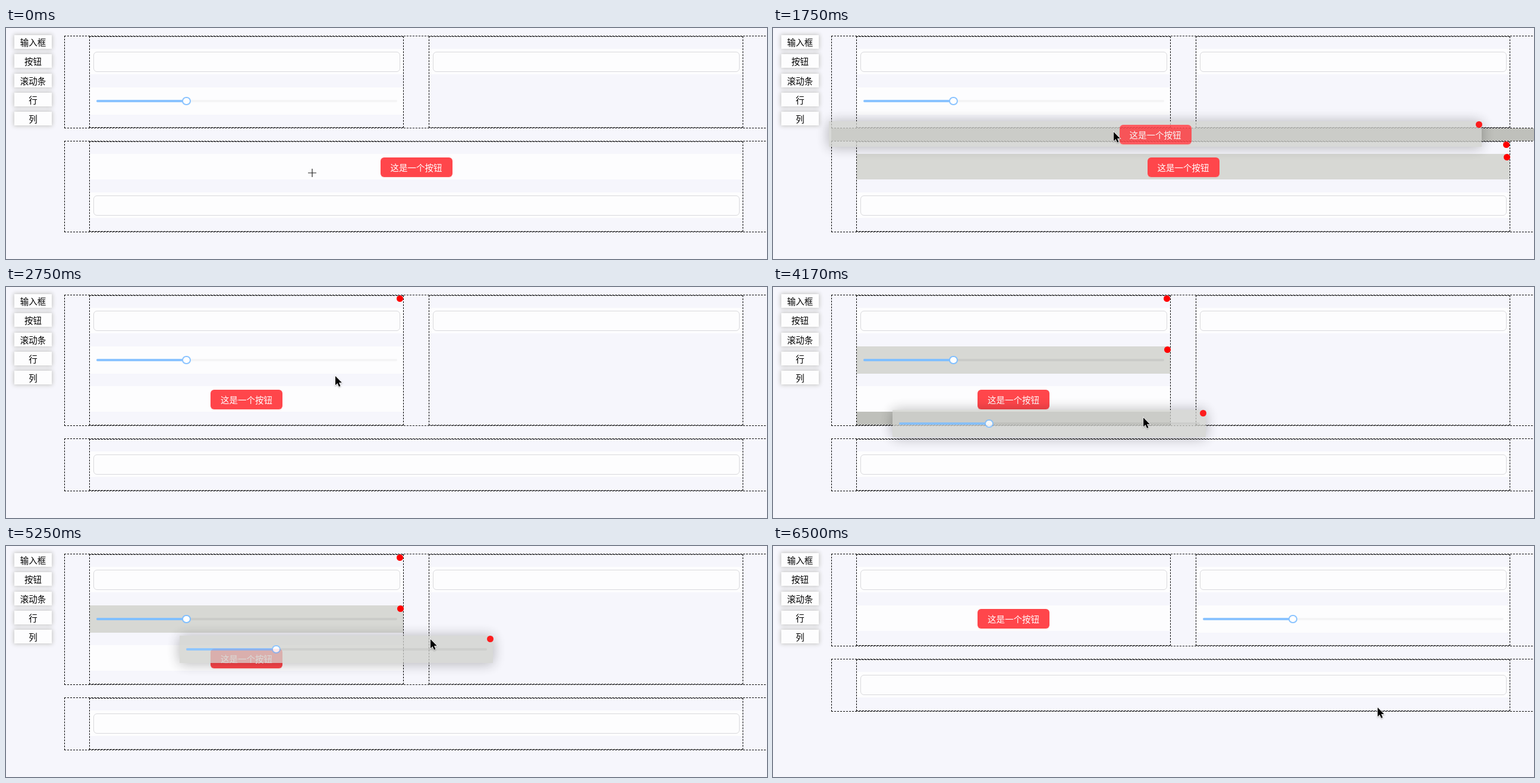
An HTML page for the animation above (6.58 s loop, 1280 by 389 pixels).

```html
<!DOCTYPE html>
<html lang="zh-CN">
<head>
<meta charset="utf-8">
<title>拖拽布局</title>
<style>
  html, body { margin: 0; width: 100%; height: 100%; overflow: hidden; }
  #stage {
    position: relative; width: 1280px; height: 389px; overflow: hidden;
    background: #f6f6fc; color: #000;
    font: 14.5px/23px "Noto Sans CJK SC", "Noto Sans CJK", sans-serif;
  }
  #stage div, #stage svg { position: absolute; box-sizing: border-box; }
  .menu { text-align: center; font-weight: 500; background: #fdfdfe; box-shadow: 0 0 7px 1px #c3c3c0; }
  .row, .col { border: 1px dashed #000; }
  .item { background: #fdfdfe; }
  .input { border: 1px solid #d9d9dc; border-radius: 6px; }
  .button {
    border-radius: 6px; background: #ff464b; color: #fff; text-align: center;
    line-height: 33px; box-shadow: 0 2px 1px rgba(255, 38, 5, .07);
  }
  .rail { border-radius: 2px; background: rgba(0, 0, 0, .035); }
  .track { border-radius: 2px; background: #8ac3ff; }
  .knob { border-radius: 50%; border: 2px solid #8ac3ff; background: #fff; }
  .dot { width: 11px; height: 11px; border-radius: 50%; background: #f00; display: none; }
  .hover > .dot { display: block; }
  .item.hover { background: #d7d8d4; }
  .active .rail { background: rgba(0, 0, 0, .06); }
  .active .track { background: #80bfff; }
  .active .knob { border-color: #80bfff; }
  .slot { background: #bfc0bb; }
  .ghost { opacity: .88; box-shadow: 0 1px 22px rgba(0, 0, 0, .33); }
  .item.ghost { background: rgba(207, 208, 204, .87); }
  .hidden { display: none; }
</style>
</head>
<body>
<div id="stage"></div>
<script>
const LOOP = 6580, GAP = 21.3;
const HEIGHT = { input: 43.4, button: 43.4, slider: 45.6 };
const stage = document.getElementById('stage');

function box(parent, cls, x, y, w, h, text = '') {
  const el = document.createElement('div');
  el.className = cls;
  Object.assign(el.style, { left: x + 'px', top: y + 'px' });
  if (w) Object.assign(el.style, { width: w + 'px', height: h + 'px' });
  el.textContent = text;
  parent.append(el);
  return el;
}

function addItem(parent, kind, x, y, w) {
  const el = box(parent, 'item', x, y, w, Math.round(HEIGHT[kind]));
  if (kind === 'input') box(el, 'input', 5.5, 5, w - 11, 33.5);
  if (kind === 'button') box(el, 'button', w / 2 - 60.5, 5.5, 121, 33, '这是一个按钮');
  if (kind === 'slider') {
    box(el, 'rail', 11, 20.5, w - 21, 4);
    box(el, 'track', 11, 20.5, 151, 4);
    box(el, 'knob', 155, 15.5, 14.5, 14.5);
  }
  box(el, 'dot', w - 10.5, 0);
  return el;
}

// Each row is a list of columns: [x, width, kinds].
function buildLayout(rows) {
  const root = box(stage, 'hidden', 0, 0, 1280, 389);
  const parts = { root };
  let top = 13;
  rows.forEach((cols, r) => {
    const inner = Math.max(...cols.map(c => c[2].reduce((s, k) => s + HEIGHT[k] + GAP, GAP)));
    const y = Math.round(top), h = Math.round(top + inner + 3) - y;
    box(root, 'row', 98, y, 1240, h);
    cols.forEach(([x, w, kinds], c) => {
      const col = box(root, 'col', x, y + 1, w, h - 2);
      box(col, 'dot', w - 13, -1);
      parts['col' + r + c] = col;
      let iy = top + 1 + GAP;
      for (const kind of kinds) {
        parts[kind + r + c] = addItem(root, kind, x + 1, Math.round(iy), w - 2);
        iy += HEIGHT[kind] + GAP;
      }
    });
    top += inner + 2 + GAP + .7;
  });
  return parts;
}

const left = kinds => [140, 529, kinds];
const right = kinds => [711, 529, kinds];
const wide = kinds => [140, 1100, kinds];
const layouts = [
  buildLayout([[left(['input', 'slider']), right(['input'])], [wide(['button', 'input'])]]),
  buildLayout([[left(['input', 'slider', 'button']), right(['input'])], [wide(['input'])]]),
  buildLayout([[left(['input', 'button']), right(['input', 'slider'])], [wide(['input'])]])
];

['输入框', '按钮', '滚动条', '行', '列'].forEach((label, i) =>
  box(stage, 'menu', 14, 12 + 32.25 * i, 63, 23, label));

const slots = {
  rowGapA: box(stage, 'slot', 98, 169, 1182, 21),
  leftEndA: box(stage, 'slot', 141, 146, 527, 21),
  leftEndB: box(stage, 'slot', 141, 210, 527, 22),
  rowGapB: box(stage, 'slot', 98, 233, 1182, 21),
  colGap: box(stage, 'slot', 669, 14, 42, 218),
  rightEnd: box(stage, 'slot', 712, 79, 527, 21)
};

// Dragged copies with the pointer position at which they were picked up.
const drags = [
  { el: addItem(stage, 'button', 141, 212, 1098), from: 1500, to: 2750, x: 620, y: 230 },
  { el: addItem(stage, 'slider', 141, 100, 527), from: 4170, to: 6170, x: 563, y: 113 }
];
drags.forEach(d => d.el.classList.add('ghost', 'hover', 'active'));

stage.insertAdjacentHTML('beforeend', `
  <svg id="cross" width="16" height="16" viewBox="-8 -8 16 16">
    <path d="M-7 0H7M0-7V7" stroke="#fff" stroke-width="2.4" opacity=".7"/>
    <path d="M-7 0H7M0-7V7" stroke="#222" stroke-width="1.2"/>
  </svg>
  <svg id="arrow" width="18" height="24" viewBox="-3 -3 18 24" style="filter:drop-shadow(0 1px 1px rgba(0,0,0,.3))">
    <path d="M0 0V15.2L3.5 12L6 17.8L8.5 16.7L6 11H10.8Z" stroke="#fff" stroke-width="1.6" paint-order="stroke"/>
  </svg>`);
const cross = document.getElementById('cross'), arrow = document.getElementById('arrow');

// [time, x, y, drag lag]
const pointer = [
  [0, 515, 244], [170, 590, 236], [250, 640, 227], [420, 637, 230], [500, 634, 230],
  [670, 628, 229], [920, 625, 229], [1000, 622, 230], [1170, 621, 230],
  [1500, 611, 222], [1670, 592, 196], [1750, 573, 175], [1920, 566, 165], [2000, 561, 157],
  [2170, 557, 150], [2420, 556, 150], [2500, 555, 150], [2670, 554, 150],
  [3170, 554, 155], [3250, 554, 161], [3420, 559, 135], [3500, 563, 115], [4000, 563, 113],
  [4170, 623, 220], [4420, 627, 229], [4500, 629, 232], [4670, 638, 233], [4750, 645, 232],
  [4920, 685, 195], [5000, 710, 175], [5170, 713, 165], [5250, 714, 157, 7],
  [5420, 718, 138], [5500, 724, 121], [5670, 724, 98], [5750, 724, 87], [6500, 1017, 272]
];

// [time, layout, hovered parts, slot]
const onButton = ['col10', 'button10'], onSlider = ['col00', 'slider00'];
const states = [
  [0, 0, []], [920, 0, onButton], [1750, 0, onButton, 'rowGapA'], [1920, 0, onButton, 'leftEndA'],
  [2750, 1, ['col00']], [3420, 1, onSlider], [4170, 1, onSlider, 'leftEndB'],
  [4500, 1, onSlider, 'rowGapB'], [4920, 1, onSlider, 'colGap'], [5170, 1, onSlider],
  [5670, 1, onSlider, 'rightEnd'], [6170, 2, ['col01']], [6500, 2, []]
];

const at = (table, t) => table.findLast(step => step[0] <= t);
const show = (el, on) => el.classList.toggle('hidden', !on);

function render(t) {
  const [, x, y, lag = 0] = at(pointer, t);
  const [, current, hovered, slot] = at(states, t);
  layouts.forEach((parts, i) => {
    show(parts.root, i === current);
    for (const name in parts) parts[name].classList.toggle('hover', i === current && hovered.includes(name));
  });
  layouts[1].slider00.classList.toggle('active', t >= 3670);
  for (const name in slots) show(slots[name], name === slot);
  for (const d of drags) {
    show(d.el, t >= d.from && t < d.to);
    d.el.style.transform = `translate(${x - d.x}px, ${y - d.y + lag}px)`;
  }
  show(cross, t < 670);
  show(arrow, t >= 670);
  cross.style.transform = `translate(${x - 8}px, ${y - 8}px)`;
  arrow.style.transform = `translate(${x - 3}px, ${y - 3}px)`;
}

const start = performance.now();
function tick() {
  render((performance.now() - start) % LOOP);
  requestAnimationFrame(tick);
}
tick();
</script>
</body>
</html>
```
